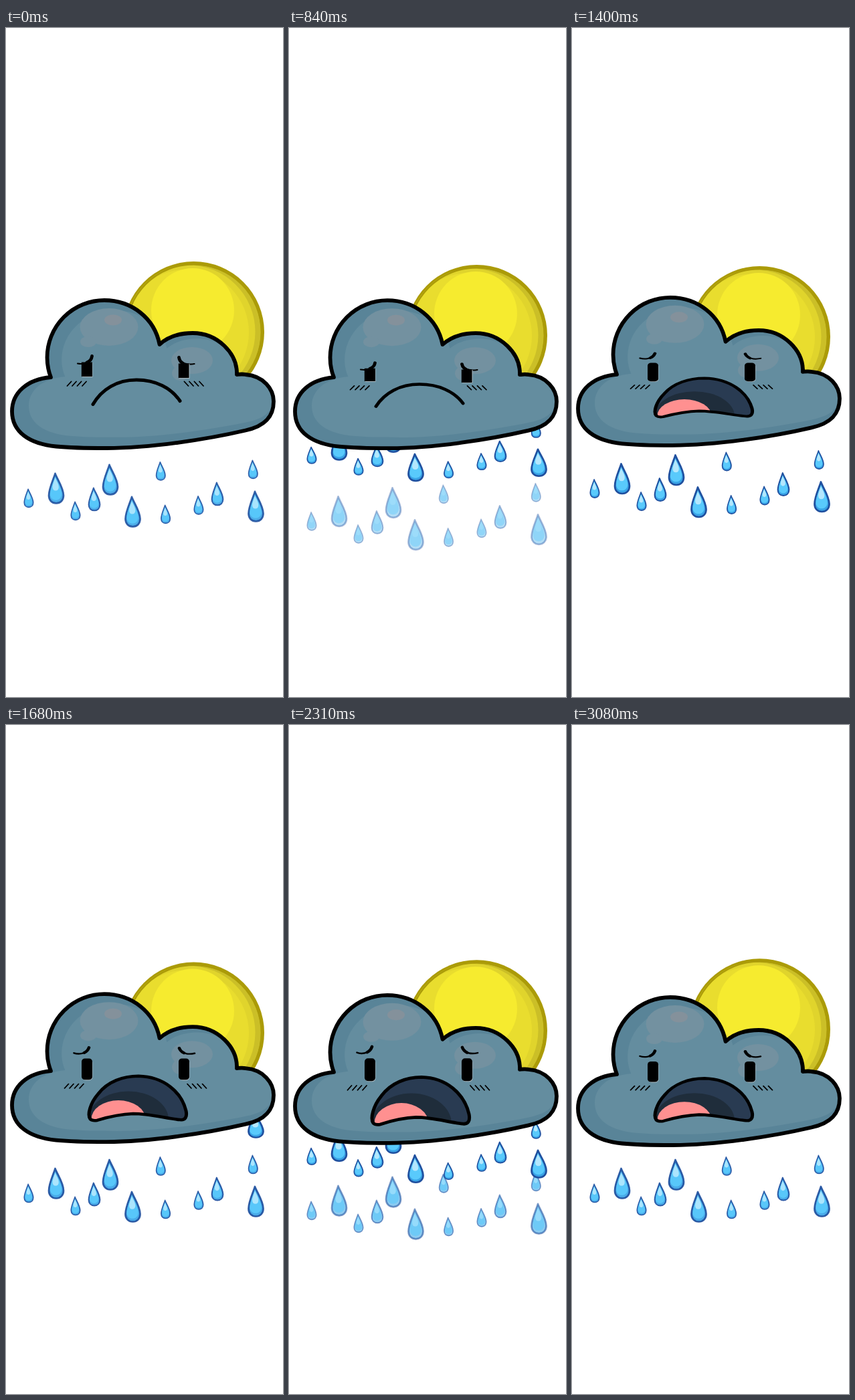
An HTML page that plays this animation: 414 px wide and 1000 px high, repeating every 3150 ms.

```html
<!DOCTYPE html>
<html lang="en">
<head>
<meta charset="utf-8">
<title>Sad rain cloud</title>
<style>
  html, body { margin: 0; width: 100%; height: 100%; overflow: hidden; background: #fff; }
  svg { display: block; width: 100vw; height: 100vh; }
  .line { fill: none; stroke: #000; stroke-linecap: round; stroke-linejoin: round; }
</style>
</head>
<body>
<svg viewBox="0 0 414 1000">
  <defs>
    <clipPath id="mouthClip"><path id="mouthHole"/></clipPath>
    <clipPath id="sunClip"><circle cx="280.5" cy="454.5" r="102.5"/></clipPath>
    <clipPath id="cloudClip"><path id="cloudHole"/></clipPath>
  </defs>

  <g id="sun">
    <circle cx="280.5" cy="454.5" r="105.5" fill="#ab9b08"/>
    <g clip-path="url(#sunClip)">
      <circle cx="280.5" cy="454.5" r="100.5" fill="#cbbf27"/>
      <g clip-path="url(#sunInner)">
        <circle cx="273" cy="454" r="99.5" fill="#e0d42c"/>
        <circle cx="269" cy="455" r="94" fill="#e9dd2e"/>
      </g>
      <ellipse cx="279" cy="422" rx="62" ry="63" fill="#f6eb2f"/>
      <circle cx="280.5" cy="454.500" r="102.800" fill="none" stroke="#ab9b08" stroke-width="5.400"/>
    </g>
  </g>

  <g id="rain"></g>

  <g id="cloud">
    <path id="cloudBase" fill="#598498"/>
    <g clip-path="url(#cloudClip)">
      <path id="cloudLight" fill="#648d9f" transform="matrix(.936 0 0 .858 25.6 73)"/>
      <g fill="#7391a0">
        <ellipse cx="154" cy="447" rx="43.5" ry="28"/>
        <ellipse cx="123" cy="469" rx="12" ry="8"/>
        <ellipse cx="278" cy="497" rx="31" ry="20"/>
        <ellipse cx="261" cy="516" rx="13" ry="11"/>
      </g>
      <ellipse cx="160" cy="436.5" rx="13" ry="8" fill="#84919b"/>
    </g>
    <path id="cloudEdge" class="line" stroke-width="5.8"/>
  </g>

  <g id="sadFace">
    <path class="line" stroke-width="2.2" d="M107 501.5C115 503 121 501 125 497M281.500 502C273 503.500 266 502 262 498"/>
    <path class="line" stroke-width="4.800" d="M121 500C126 498 128 494 128.500 490.500M264.500 501.500C260.500 499 259 496 258.500 492.500"/>
    <path fill="#a9b8bf" d="M114 500h15.500v22h-15.500zM259 502h15.500v22h-15.500z"/>
    <path d="M112.800 499.500h16.200v21.500h-16.200zM257.800 501.500h15.700v21.500h-15.700z"/>
    <path class="line" stroke-width="5" d="M130 562.500C143 540 166 526 195 526C224 526 247 538 260 557.500"/>
  </g>

  <g id="openFace">
    <path class="line" stroke-width="2.600" d="M101.500 488C109 491 117 488.500 121 485M282 488.500C274 490.500 267 489 263 485.500"/>
    <path class="line" stroke-width="4.600" d="M117 487.500C121 485.500 123 482 124 479M266 488C262.500 486 260 483 259 480"/>
    <g fill="#a9b8bf">
      <rect x="114" y="499" width="15.500" height="34" rx="5"/>
      <rect x="259" y="499" width="15.500" height="34" rx="5"/>
    </g>
    <rect x="113" y="497" width="16" height="35" rx="5"/>
    <rect x="258" y="497" width="16" height="35" rx="5"/>
    <g clip-path="url(#mouthClip)">
      <rect x="115" y="515" width="165" height="95" fill="#293b52"/>
      <ellipse cx="183" cy="598" rx="60" ry="47" fill="#1f2d3b"/>
      <ellipse cx="168" cy="597" rx="40.500" ry="31" fill="#ff9090"/>
    </g>
    <path id="mouthEdge" class="line" stroke-width="5"/>
  </g>
</svg>

<script>
const LOOP = 3150, STEP = 70, FACE_SWITCH = 1330;
const el = id => document.getElementById(id);

const cloudPath = 'M67 522C63 512 61.500 502 61.500 492.500A85.500 85.500 0 0 1 147 407' +
  'C188 407 222 434 229.500 473C244 460 262 456 279 456' +
  'C316 456 346 486 345 518C350 517.500 353 517 358 518C385 520 400 540 400 558' +
  'C400 580 388 595 358 601.500C300 615 215 628 150 628C120 628 95 627.500 75 625.500' +
  'C35 621.500 9 604 9 573C9 545 32 525 67 522Z';
for (const id of ['cloudHole', 'cloudBase', 'cloudLight', 'cloudEdge']) el(id).setAttribute('d', cloudPath);

const mouthPath = 'M126 597C121 590 126 570 138 555C152 535 175 526 198 526' +
  'C236 527 262 552 269 583C271 593 268 599 260 598C240 596 215 588 190 588' +
  'C165 589 145 596 136 599C130 600 128 599 126 597Z';
for (const id of ['mouthHole', 'mouthEdge']) el(id).setAttribute('d', mouthPath);

// Four slashes under each eye, mirrored.
function addBlush(face, left, right, top, height) {
  let d = '';
  for (let i = 0; i < 4; i++) {
    d += `M${left + i * 7.5} ${top + height}l6 ${-height}M${right + i * 7.5} ${top}l6 ${height}`;
  }
  el(face).insertAdjacentHTML('beforeend', `<path class="line" stroke-width="1.800" d="${d}"/>`);
}
addBlush('sadFace', 91.5, 266.5, 528.5, 6.5);
addBlush('openFace', 87.5, 271, 539, 7);

// Raindrops: centre x, top y, scale.
const BIG = 1, MID = 0.76, SMALL = 0.61;
const drops = [
  [34, 674, SMALL], [75, 650, BIG], [104, 693, SMALL], [132, 672, MID],
  [156, 637, BIG], [189.5, 685, BIG], [231.3, 633.5, SMALL], [238.6, 698, SMALL],
  [288, 684.5, SMALL], [316, 664, MID], [369.3, 631, SMALL], [373.5, 677, BIG]
];
const dropPath = 'M-1.500 1.500C1 9 11 23 11 34.500C11 41.500 6.500 46 0 46' +
  'C-6.500 46 -11 41.500 -11 34.500C-11 24 -4 10 -1.500 1.500Z';
const dropShape = ([x, y, k]) => `<g transform="translate(${x} ${y}) scale(${k})">
  <path d="${dropPath}" fill="#38a3e6" stroke="#20509f" stroke-width="2.700" stroke-linejoin="round"/>
  <path d="${dropPath}" fill="#59cafc" transform="translate(-.4 5) scale(.78 .79)"/>
  <path d="${dropPath}" fill="#b4e7fd" transform="translate(-.8 7) scale(.42 .44)"/></g>`;
const showers = [1400, 2800].map(slowAt => {
  const group = document.createElementNS('http://www.w3.org/2000/svg', 'g');
  group.innerHTML = drops.map(dropShape).join('');
  el('rain').append(group);
  return { group, slowAt };
});

// Rows of [time, value, ...]
const sunKeys = [[0, 0], [560, 3.7], [1120, 6.1], [1400, 6.9], [1680, 5.5], [1960, 4], [2310, 2.2], [2800, 0.7], [3150, 0]];
const cloudKeys = [[0, 0], [560, 2.5], [1120, -2.9], [1400, -4.2], [1960, -5], [2310, -3.2], [3080, 0], [3150, 0]];
const sadKeys = [[0, 488, 1], [560, 506, 0.853], [1120, 487, 0.98], [1400, 484, 1]];
const openKeys = [[1260, 486.5, 0.74], [1400, 484, 0.79], [1960, 476, 1], [2310, 478, 0.968], [3080, 484.5, 0.875], [3150, 485, 0.868]];

// Smooth curve through the rows of a track.
function sample(keys, t, col = 1) {
  const last = keys.length - 1;
  let i = 0;
  while (i < last - 1 && t >= keys[i + 1][0]) i++;
  const slope = j => {
    const a = keys[Math.max(j - 1, 0)], b = keys[Math.min(j + 1, last)];
    return (b[col] - a[col]) / (b[0] - a[0]);
  };
  const a = keys[i], b = keys[i + 1], span = b[0] - a[0];
  const u = (t - a[0]) / span, v = 1 - u;
  return v * v * ((1 + 2 * u) * a[col] + u * span * slope(i)) +
         u * u * ((3 - 2 * u) * b[col] - v * span * slope(i + 1));
}

const shift = (node, y) => node.setAttribute('transform', `translate(0 ${y})`);
const stretch = (node, from, to, s) => node.setAttribute('transform', `matrix(1 0 0 ${s} 0 ${to - s * from})`);

// Fast stretching fall out of the cloud, then a slow drift in which every layer fades.
function moveShower({ group, slowAt }, t) {
  const age = (t - slowAt + 1400 + LOOP) % LOOP - 1400;
  const falling = age < 0;
  const y = 677 + age * (falling ? 0.087 : 0.041);
  stretch(group, 677, y, falling ? 1 + age * 0.000175 : 1);
  const fade = falling ? 1 : 1 - Math.min(age / 1680, 1) ** 1.4;
  const alpha = age < -1300 ? 0 : fade;
  group.setAttribute('fill-opacity', alpha);
  group.setAttribute('stroke-opacity', alpha);
  return age;
}

function moveFace(id, keys, from, t, visible) {
  const face = el(id);
  face.style.display = visible ? '' : 'none';
  if (visible) stretch(face, from, sample(keys, t, 1), sample(keys, t, 2));
}

function draw(now) {
  const t = Math.floor((now % LOOP) / STEP) * STEP;
  shift(el('sun'), sample(sunKeys, t));
  shift(el('cloud'), sample(cloudKeys, t));
  moveFace('sadFace', sadKeys, 488, t, t < FACE_SWITCH);
  moveFace('openFace', openKeys, 476, t, t >= FACE_SWITCH);
  const ages = showers.map(s => moveShower(s, t));
  const older = showers[ages[0] > ages[1] ? 0 : 1].group;
  if (el('rain').firstChild !== older) el('rain').prepend(older);
}

let start;
function tick(now) {
  start ??= now;
  draw(now - start);
  requestAnimationFrame(tick);
}
draw(0);
requestAnimationFrame(tick);
</script>
</body>
</html>
```
